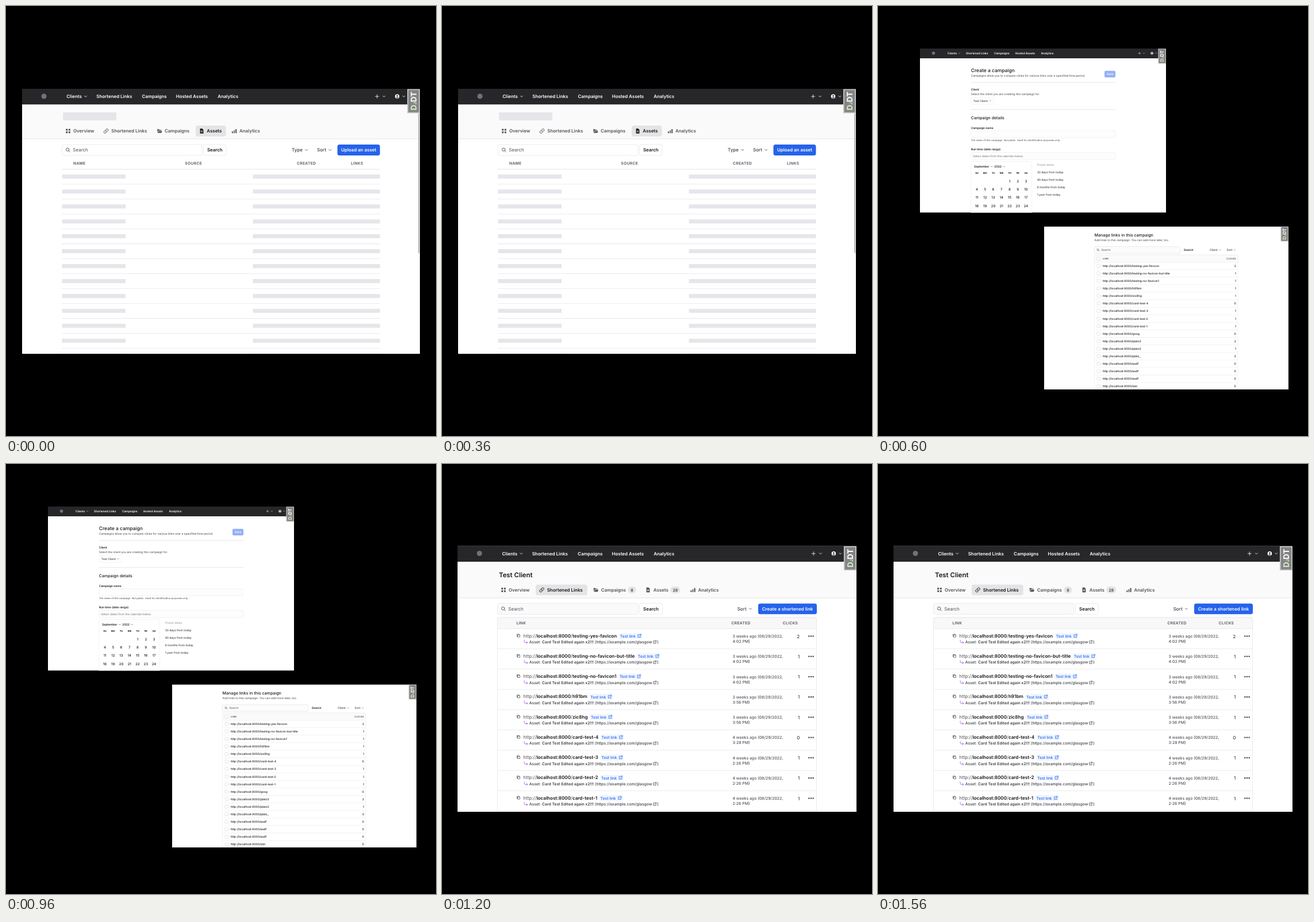
An HTML page with a canvas that plays this animation: 748x748 px, repeating every 1800 ms.

```html
<!DOCTYPE html>
<html lang="en">
<head>
<meta charset="utf-8">
<title>Link manager screens</title>
<style>
  html, body { margin: 0; width: 100%; height: 100%; overflow: hidden; background: #000; }
  canvas { display: block; }
</style>
</head>
<body>
<canvas id="stage" width="748" height="748"></canvas>
<script>
const ctx = document.getElementById('stage').getContext('2d');
const INK = '#18181b', BODY = '#3f3f46', MUTED = '#52525b', LINE = '#e6e6ea', SOFT = '#efeff1', BLUE = '#2563eb';

// Icons live in a 24-unit box.
const ICONS = {
  chevron: 'M6 9l6 6 6-6',
  plus: 'M12 3v18M3 12h18',
  search: 'M16 16l5 5M17 10a7 7 0 1 1-14 0a7 7 0 1 1 14 0',
  grid: 'M3 3h7v7H3zM14 3h7v7h-7zM3 14h7v7H3zM14 14h7v7h-7z',
  link: 'M10 14a5 5 0 0 0 7 0l3-3a5 5 0 0 0-7-7l-2 2M14 10a5 5 0 0 0-7 0l-3 3a5 5 0 0 0 7 7l2-2',
  folder: 'M3 4h7l2 3h8v3H7l-4 8zM8 12h15l-3 8H4z',
  doc: 'M5 2h9l5 5v15H5zM8 11h8v2H8zM8 15h8v2H8z',
  bars: 'M2 14h5v7H2zM10 9h4v12h-4zM17 4h5v17h-5z',
  copy: 'M8 8h12v12H8zM16 8V4H4v12h4',
  external: 'M11 5H4v15h15v-7M14 3h7v7M21 3L10 14',
  turn: 'M4 3v8a4 4 0 0 0 4 4h12M15 10l5 5-5 5',
  user: 'M12 2a10 10 0 1 0 0 20a10 10 0 1 0 0-20zM12 6a3.5 3.5 0 1 0 0 7a3.5 3.5 0 1 0 0-7zM6 18q6-6 12 0q-6 4-12 0z'
};
const FILLED = new Set(['grid', 'folder', 'doc', 'bars', 'user']);
for (const name in ICONS) ICONS[name] = new Path2D(ICONS[name]);

function icon(name, x, y, size, color) {
  ctx.save();
  ctx.translate(x - size / 2, y - size / 2);
  ctx.scale(size / 24, size / 24);
  ctx.fillStyle = ctx.strokeStyle = color;
  ctx.lineWidth = 2.4;
  ctx.lineCap = ctx.lineJoin = 'round';
  if (FILLED.has(name)) ctx.fill(ICONS[name], 'evenodd');
  else ctx.stroke(ICONS[name]);
  ctx.restore();
}

// y is the middle of the capitals; returns the x where the text ends.
function text(str, x, y, size, color = INK, weight = 500, align = 'left', spacing = 0) {
  ctx.font = `${weight} ${size}px Inter, sans-serif`;
  ctx.letterSpacing = spacing + 'px';
  ctx.textAlign = align;
  ctx.fillStyle = color;
  ctx.fillText(str, x, y + size * 0.364);
  return x + ctx.measureText(str).width;
}

function box(left, top, right, bottom, fill, stroke, radius = 0) {
  ctx.beginPath();
  ctx.roundRect(left, top, right - left, bottom - top, radius);
  if (fill) { ctx.fillStyle = fill; ctx.fill(); }
  if (stroke) { ctx.strokeStyle = stroke; ctx.lineWidth = 0.8; ctx.stroke(); }
}

const rule = (left, right, y, color = LINE) => box(left, y - 0.4, right, y + 0.4, color);

function dot(x, y, r, color) {
  ctx.fillStyle = color;
  ctx.beginPath();
  ctx.arc(x, y, r, 0, 7);
  ctx.fill();
}

function navBar() {
  box(0, 0, 692, 27.3, '#27272a');
  dot(38, 13, 4.5, '#71717a');
  [['Clients', 77.3], ['Shortened Links', 129.3], ['Campaigns', 208.5], ['Hosted Assets', 267.8], ['Analytics', 340.2]]
    .forEach(([label, x]) => text(label, x, 13.3, 7.9, '#fff', 600));
  icon('plus', 617.5, 13.3, 8, '#fff');
  icon('user', 652.5, 13.3, 9, '#fff');
  for (const x of [110.5, 629.5, 664]) icon('chevron', x, 13.3, 8, '#fff');
}

function debugHandle() {
  box(670, 0.5, 692, 42.5, '#c4c4c4');
  box(671.8, 2.2, 690.2, 40.8, '#858585');
  ctx.save();
  ctx.translate(681, 37.5);
  ctx.rotate(-Math.PI / 2);
  let x = text('D', 0, 0, 13.5, '#d5f0c4', 700);
  x = text('J', x, 2.5, 7.5, '#d5f0c4', 700);
  text('DT', x, 0, 13.5, '#fff', 700);
  ctx.restore();
}

// A white clipped window; its chrome is laid out on a 692-unit width.
function appWindow(x, y, w, h, hasNav, content) {
  const chrome = draw => {
    ctx.save();
    ctx.translate(x, y);
    ctx.scale(w / 692, w / 692);
    draw();
    ctx.restore();
  };
  ctx.save();
  ctx.beginPath();
  ctx.rect(x, y, w, h);
  ctx.clip();
  box(x, y, x + w, y + h, '#fff');
  content();
  if (hasNav) chrome(navBar);
  chrome(debugHandle);
  ctx.restore();
}

function tab(name, label, x, y, iconX, active, badge) {
  const color = active ? INK : MUTED;
  icon(name, iconX, y, 10, color);
  const end = text(label, x, y, 7.9, color, 600);
  if (!badge) return;
  const width = badge.length > 1 ? 17 : 14;
  box(end + 3.5, y - 6, end + 3.5 + width, y + 6, '#e4e4e7', null, 6);
  text(badge, end + 3.5 + width / 2, y, 6.9, BODY, 600, 'center');
}

function searchField(left, right, y, half, size, fill) {
  box(left, y - half, right, y + half, fill, LINE, half / 3);
  icon('search', left + size * 1.3, y, size * 1.15, MUTED);
  text('Search', left + size * 2.35, y, size, MUTED, 400);
}

function menu(label, x, y, size, color = BODY, weight = 500) {
  const end = text(label, x, y, size, color, weight);
  icon('chevron', end + size * 0.85, y, size, color);
}

const heading = (label, x, y, size = 6.7, align = 'left') =>
  text(label, x, y, size, MUTED, 600, align, size * 0.05);

function assetsScreen() {
  appWindow(28, 144, 692, 461, true, () => {
    box(28, 171, 720, 231, '#fafafa');
    rule(28, 720, 231);
    box(99, 185, 192, 199, '#e6e6ea', null, 2);
    box(330, 208, 382.5, 227, '#e4e4e7', null, 3.5);
    tab('grid', 'Overview', 117, 217.5, 108);
    tab('link', 'Shortened Links', 183.3, 217.5, 174);
    tab('folder', 'Campaigns', 276, 217.5, 267);
    tab('doc', 'Assets', 349.3, 217.5, 340.5, true);
    tab('bars', 'Analytics', 406, 217.5, 397);

    searchField(97.5, 341, 250.5, 9.5, 8, '#fff');
    box(343.5, 241, 383, 260, '#fff', LINE, 3.5);
    text('Search', 363.3, 250.5, 7.9, INK, 600, 'center');
    menu('Type', 497, 250.5, 8);
    menu('Sort', 541, 250.5, 8);
    box(576.5, 241, 650.5, 260, BLUE, null, 3.5);
    text('Upload an asset', 613.5, 250.5, 7.9, '#fff', 600, 'center');

    heading('NAME', 117, 274);
    heading('SOURCE', 311.3, 274);
    heading('CREATED', 506, 274);
    heading('LINKS', 600, 274);
    for (let i = 0; i < 13; i++) {
      const y = 284 + 25.95 * i;
      rule(97, 651, y);
      box(97.5, y + 9.3, 208, y + 16.3, '#e6e6ea');
      box(429.5, y + 9.3, 650.5, y + 16.3, '#e6e6ea');
    }
    box(717, 187, 719.2, 430, '#b8b8b8', null, 1);
  });
}

function campaignForm() {
  const left = 161.8, right = 413, size = 4.95;
  text('Create a campaign', left, 111.8, 8.45);
  text('Campaigns allow you to compare clicks for various links over a specified time period.', left, 120.8, size, BODY, 400);
  box(394, 112.8, right, 124.3, '#93b1f5', null, 2);
  text('Save', 403.5, 118.5, 4.9, '#fff', 600, 'center');
  rule(left, right, 133);
  text('Client', left, 145.3, size, INK, 600);
  text('Select the client you are creating this campaign for.', left, 153.2, size, BODY, 400);
  box(left, 159, 201, 171, '#fff', SOFT, 2);
  menu('Test Client', 165.8, 165, size);
  rule(left, right, 180);
  text('Campaign details', left, 194, 7);
  text('Campaign name', left, 211.8, size, INK, 600);
  box(left, 217, right, 229, '#fdfdfd', SOFT, 2);
  text('The name of this campaign. Not public. Used for identification purposes only.', left, 233.7, 4.25, BODY, 400);
  text('Run time (date range)', left, 249.5, size, INK, 600);
  box(left, 254.5, right, 267, '#fdfdfd', SOFT, 2);
  text('Select dates from the calendar below', 165, 261, size, '#71717a', 400);

  box(left, 270.5, 267.5, 375, '#fff', SOFT, 2);
  menu('September', 167, 279.3, 5, INK, 600);
  menu('2022', 202.3, 279.3, 5, INK, 600);
  const column = i => 172 + 14.25 * i;
  ['SU', 'MO', 'TU', 'WE', 'TH', 'FR', 'SA'].forEach((day, i) =>
    text(day, column(i), 290.7, 4.1, INK, 700, 'center'));
  for (let day = 1; day <= 24; day++) {
    const cell = day + 3;
    text(day, column(cell % 7), 304.8 + 14.25 * Math.floor(cell / 7), 6, INK, 500, 'center');
  }
  text('Preset dates', 276.7, 276.2, size, '#a1a1aa');
  ['30 days', '90 days', '6 months', '1 year'].forEach((span, i) =>
    text(span + ' from today', 276.7, 289.2 + 12.85 * i, size, BODY));
}

function campaignLinks() {
  const left = 376.5, right = 626, size = 4.95;
  text('Manage links in this campaign', left, 398, 7.1);
  text('Add links to this campaign. You can add more later, too.', left, 406.7, size, BODY, 400);
  searchField(left, 526, 424.5, 5.8, size, '#fcfcfc');
  text('Search', 531.7, 424.5, size, INK, 600);
  menu('Client', 577, 424.5, size);
  menu('Sort', 606.5, 424.5, size);
  box(left, 433, right, 680, '#fff', SOFT, 2);
  box(left, 433, right, 446, '#fafafa', SOFT, 2);
  heading('LINK', 391, 439.5, 4.2);
  heading('CLICKS', 622.7, 439.5, 4.2, 'right');
  const checkbox = y => box(381, y - 2.8, 386.6, y + 2.8, '#fff', '#dedee2', 1);
  checkbox(439.5);
  const slugs = ['testing-yes-favicon', 'testing-no-favicon-but-title', 'testing-no-favicon1', 'h91bm', 'zic8hg',
    'card-test-4', 'card-test-3', 'card-test-2', 'card-test-1', 'goog', 'plato3', 'plato2', 'plato_',
    'asdf', 'asdf', 'asdf', 'iam'];
  slugs.forEach((slug, i) => {
    const y = 452 + 13.1 * i;
    checkbox(y);
    text('http://localhost:8000/' + slug, 390.8, y, size);
    text('21111011102130000'[i], 622.7, y, size, INK, 500, 'right');
    rule(left, right, y + 6.6, SOFT);
  });
}

function campaignScreen() {
  appWindow(73, 74, 428, 285.5, true, campaignForm);
  appWindow(289, 383.5, 425, 283.5, false, campaignLinks);
}

function linkRow(slug, y, clicks, weeks, time) {
  icon('copy', 133, y - 0.5, 7.5, MUTED);
  let x = text('http://', 141.2, y - 0.3, 8.1, MUTED, 400);
  x = text('localhost:8000', x, y - 0.3, 8.1, INK, 600);
  x = text('/', x, y - 0.3, 8.1, MUTED, 400);
  x = text(slug, x, y - 0.3, 8.1, INK, 600) + 5.5;
  box(x - 1.5, y - 5, x + 39, y + 5.5, '#eff6ff', null, 2);
  x = text('Test link', x, y + 0.3, 6.8, BLUE);
  icon('external', x + 6.5, y, 7.5, BLUE);

  icon('turn', 146, y + 10.5, 8.5, '#a855f7');
  x = text('Asset: ', 151.7, y + 10.7, 6.8, BODY);
  x = text('Card Test Edited again x2!!!', x, y + 10.7, 6.8, BODY, 600);
  x = text(' (https://example.com/glasgow', x, y + 10.7, 6.8, BODY);
  icon('external', x + 4.7, y + 10.7, 7, BODY);
  text(')', x + 8.8, y + 10.7, 6.8, BODY);

  text(`${weeks} weeks ago (08/29/2022,`, 505.5, y + 0.6, 6.9, MUTED);
  text(time + ' PM)', 505.5, y + 9.6, 6.9, MUTED);
  text(clicks, 622.3, y + 0.6, 8, BODY, 500, 'right');
  for (const dx of [-3.6, 0, 3.6]) dot(642, y + 0.5, 0, BODY), dot(642 + dx, y + 0.5, 1.2, BODY);
}

function linksScreen() {
  appWindow(27, 142.5, 694, 462.5, true, () => {
    box(27, 170, 721, 233, '#fafafa');
    rule(27, 721, 233);
    text('Test Client', 99, 193, 11.4, INK, 600);
    box(163, 209.7, 252.7, 228.3, '#e4e4e7', null, 3.5);
    tab('grid', 'Overview', 116, 219, 107);
    tab('link', 'Shortened Links', 182.7, 219, 173.5, true);
    tab('folder', 'Campaigns', 276.7, 219, 267.5, false, '8');
    tab('doc', 'Assets', 367.7, 219, 358.5, false, '28');
    tab('bars', 'Analytics', 445.5, 219, 436.5);

    searchField(96.5, 341, 252, 9.7, 8, '#fafafa');
    box(343.5, 242.3, 383.5, 261.7, '#fff', LINE, 3.5);
    text('Search', 363.5, 252, 7.9, INK, 600, 'center');
    menu('Sort', 513.7, 252, 8);
    box(550, 242.7, 652, 261.3, BLUE, null, 3.5);
    text('Create a shortened link', 601, 252, 7.9, '#fff', 600, 'center');

    box(96.5, 267, 651.5, 620, '#fff', LINE, 3.5);
    box(96.5, 267, 651.5, 286.5, '#f8f8f9', LINE, [3.5, 3.5, 0, 0]);
    heading('LINK', 129.5, 276.5);
    heading('CREATED', 503.5, 276.5);
    heading('CLICKS', 619.3, 276.5, 6.7, 'right');
    const slugs = ['testing-yes-favicon', 'testing-no-favicon-but-title', 'testing-no-favicon1', 'h91bm', 'zic8hg',
      'card-test-4', 'card-test-3', 'card-test-2', 'card-test-1'];
    slugs.forEach((slug, i) => {
      const y = 299 + 35.25 * i;
      const time = i < 3 ? '4:02' : i < 5 ? '3:56' : i < 6 ? '3:28' : '2:26';
      linkRow(slug, y, '211110111'[i], i < 5 ? 3 : 4, time);
      rule(96.5, 651.5, y + 22.7);
    });
  });
}

const screens = [assetsScreen, campaignScreen, linksScreen];

function render(now) {
  ctx.textRendering = 'geometricPrecision';
  box(0, 0, 748, 748, '#000');
  screens[Math.floor(now / 600) % screens.length]();
  requestAnimationFrame(() => render(performance.now()));
}
render(performance.now());
</script>
</body>
</html>
```
